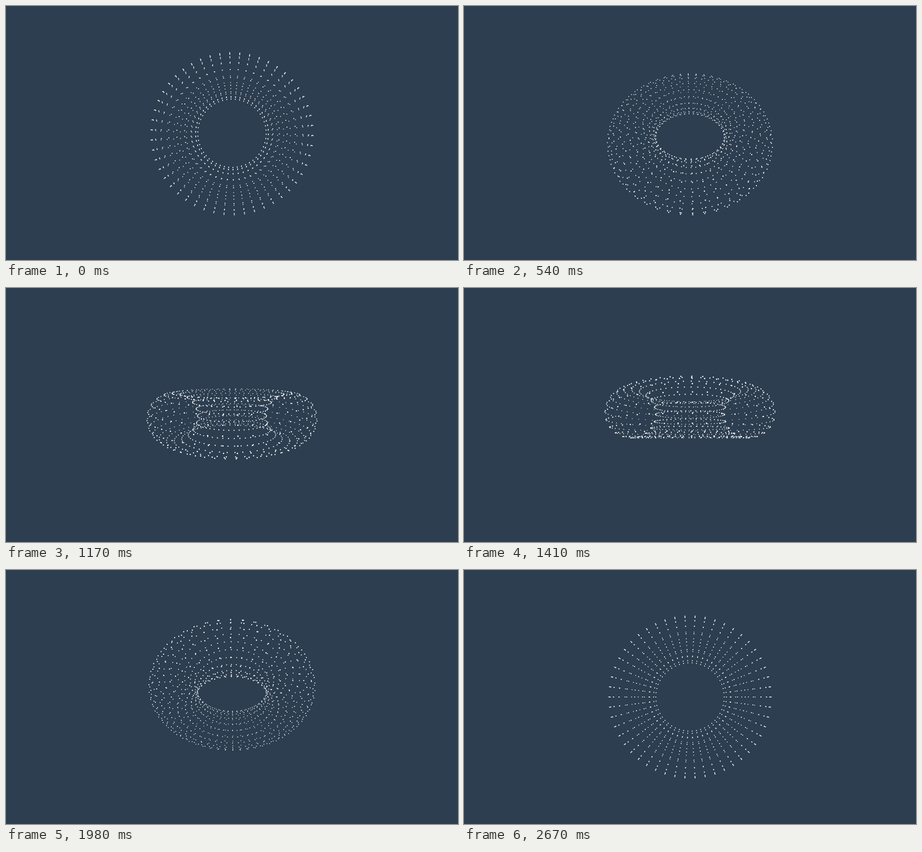
These frames come from a looping animation (960x540 px, 2.7 s). An HTML page with a canvas:

```html
<!DOCTYPE html>
<html lang="en">
<head>
<meta charset="utf-8">
<title>Dotted torus</title>
<style>
  html, body { margin: 0; width: 100%; height: 100%; overflow: hidden; background: #2c3e50; }
  canvas { display: block; }
</style>
</head>
<body>
<canvas id="stage" width="960" height="540"></canvas>
<script>
const ctx = document.getElementById('stage').getContext('2d');
const WIDTH = 960, HEIGHT = 540;
const TAU = Math.PI * 2;
const LOOP = 2700, STEP = 30, TURN = Math.PI / 90;
const RINGS = 50, RING_DOTS = 20;
const MAJOR = 121, MINOR = 48.4, EYE = 480, DOT = 1;

function drawDot(x, y, z) {
  const scale = EYE / (EYE - z);
  const px = WIDTH / 2 + x * scale;
  const py = HEIGHT / 2 + y * scale;
  const radius = DOT * scale;
  ctx.moveTo(px + radius, py);
  ctx.arc(px, py, radius, 0, TAU);
}

// The torus spins about its own axis and tilts about the x axis by the same angle.
function drawTorus(angle) {
  const cosTilt = Math.cos(angle), sinTilt = Math.sin(angle);
  ctx.fillStyle = '#2c3e50';
  ctx.fillRect(0, 0, WIDTH, HEIGHT);
  ctx.fillStyle = '#fff';
  ctx.beginPath();
  for (let i = 0; i < RINGS; i++) {
    const around = i / RINGS * TAU + angle;
    for (let j = 0; j < RING_DOTS; j++) {
      const tube = j / RING_DOTS * TAU;
      const reach = MAJOR + MINOR * Math.cos(tube);
      const x = reach * Math.cos(around);
      const y = reach * Math.sin(around);
      const z = MINOR * Math.sin(tube);
      drawDot(x, y * cosTilt - z * sinTilt, y * sinTilt + z * cosTilt);
    }
  }
  ctx.fill();
}

function render(now) {
  const step = Math.floor((now % LOOP + 0.01) / STEP);
  drawTorus((step + 1) * TURN);
  requestAnimationFrame(render);
}

drawTorus(TURN);
requestAnimationFrame(render);
</script>
</body>
</html>
```
